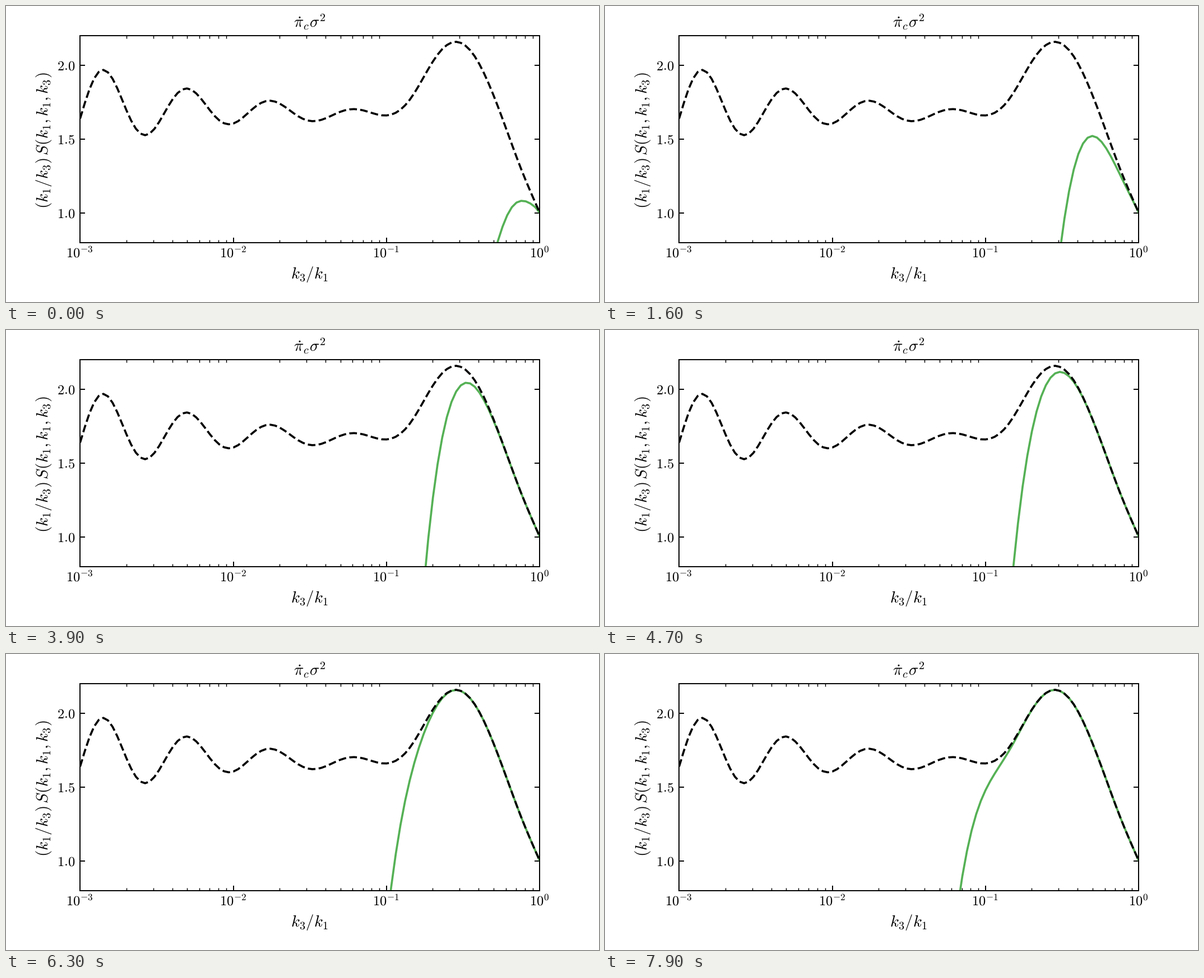
Animation of 1058x529 px, one loop 8 s. Source, as a matplotlib script:

```python
import numpy as np
import matplotlib.pyplot as plt
from matplotlib.animation import FuncAnimation
from matplotlib.ticker import FixedLocator, NullFormatter

W, H, DPI = 1058, 529, 128
PT = W / 6 / DPI          # layout points: 6 inches across the stage
FRAMES, STEP = 80, 100
LEFT, RIGHT, BOTTOM, TOP = 0.125 * W, 0.9 * W, 0.8 * H, 0.1 * H
LOW, HIGH = 0.8, 2.2

plt.rcParams.update({
    "mathtext.fontset": "cm",
    "font.family": "DejaVu Serif",
    "text.hinting": "none",
})


def spline(points):
    """Natural cubic spline through a few (x, y) points."""
    xk, yk = np.array(points, float).T
    n, h = len(xk), np.diff(xk)
    a, r = np.eye(n), np.zeros(n)
    for i in range(1, n - 1):
        a[i, i - 1:i + 2] = h[i - 1], 2 * (h[i - 1] + h[i]), h[i]
        r[i] = 6 * ((yk[i + 1] - yk[i]) / h[i] - (yk[i] - yk[i - 1]) / h[i - 1])
    m = np.linalg.solve(a, r)

    def f(x):
        i = np.clip(np.searchsorted(xk, x) - 1, 0, n - 2)
        d, p, q = h[i], xk[i + 1] - x, x - xk[i]
        return ((m[i] * p**3 + m[i + 1] * q**3) / (6 * d)
                + (yk[i] / d - m[i] * d / 6) * p
                + (yk[i + 1] / d - m[i + 1] * d / 6) * q)
    return f


# smooth plateau, then the bump and the fall to 1 (pixels)
background = spline([(132, 181), (390, 185), (560, 192.5), (640, 194.4),
                     (685, 188), (725, 158.3), (770, 92.4), (802, 65.5),
                     (836, 85.8), (870, 158), (919, 294), (952.2, 370)])


def final(x):
    """Background plus an oscillation damped as the square root of k."""
    amp = 67.5 * 10 ** ((173 - x) / 546.7)
    return background(x) - amp * np.cos(2 * np.pi * (x - 175.6) / 149.2)


def cross(t):
    """Pixel x where the growing curve enters the plot."""
    s = t - 44
    return 736 - 2.48 * s - 0.00037 * s**3


def rate(t):
    return 0.028 - 0.0056 * np.cos(2 * np.pi * (t - 12) / 90)


def bend(t):
    return 1e-4 * (0.8 + 1.5 * np.exp(-t / 8) + 1.4 * np.exp(-((t - 67) / 15) ** 2))


def to_value(y):
    return LOW + (HIGH - LOW) * (BOTTOM - y) / (BOTTOM - TOP)


def to_pixel(v):
    return BOTTOM - (v - LOW) / (HIGH - LOW) * (BOTTOM - TOP)


X = np.linspace(LEFT, RIGHT, 100)
K = np.logspace(-3, 0, 100)
BASE = final(X)


def growing(t):
    """The final curve minus a gap that closes to the right of the crossing."""
    c = cross(t)
    u = X - c
    gap = (BOTTOM - final(c)) * np.exp(-rate(t) * u - bend(t) * u * np.abs(u))
    gap *= np.tanh((RIGHT - X) / 14.6)
    return to_value(np.minimum(BASE + gap, 3000))


fig = plt.figure(figsize=(W / DPI, H / DPI), dpi=DPI, facecolor="white")
ax = fig.add_axes([0.125, 0.2, 0.775, 0.7])
ax.set_xscale("log")
ax.set_xlim(1e-3, 1)
ax.set_ylim(LOW, HIGH)
ax.xaxis.set_major_locator(FixedLocator([10.0**e for e in range(-3, 1)]))
ax.xaxis.set_minor_locator(
    FixedLocator([d * 10.0**e for e in range(-3, 0) for d in range(2, 10)]))
ax.yaxis.set_major_locator(FixedLocator([1, 1.5, 2]))
for axis in (ax.xaxis, ax.yaxis):
    axis.set_major_formatter(NullFormatter())
    axis.set_minor_formatter(NullFormatter())
ax.tick_params(which="major", direction="in", right=True,
               length=3.5 * PT, width=0.8 * PT)
ax.tick_params(which="minor", direction="in", top=True,
               length=2 * PT, width=0.6 * PT)
for s in ax.spines.values():
    s.set_linewidth(0.8 * PT)


def label(x, y, text, size, **kw):
    opts = dict(ha="center", va="baseline", fontsize=size * PT, color="black")
    opts.update(kw)
    fig.text(x / W, 1 - y / H, text, **opts)


for e in range(-3, 1):
    label(RIGHT + e * (RIGHT - LEFT) / 3 - 0.5, 449, f"$10^{{{e}}}$", 10)
for v in (1.0, 1.5, 2.0):
    label(123.5, to_pixel(v) + 8.5, f"${v:.1f}$", 10, ha="right")
MID = (LEFT + RIGHT) / 2
label(MID - 0.5, 38, r"$\dot{\pi}_c\sigma^2$", 11.7)
label(MID - 0.5, 487, r"$k_3/k_1$", 11.8)
label(76, 240, r"$(k_1/k_3)\,S(k_1,k_1,k_3)$", 11.9, rotation=90,
      rotation_mode="anchor")

green, = ax.plot(K, growing(0), color="#55b155", lw=1.5 * PT)
ax.plot(K, to_value(BASE), "--", color="black", lw=1.5 * PT)


def update(t):
    green.set_ydata(growing(t))
    return green,


anim = FuncAnimation(fig, update, frames=FRAMES, interval=STEP,
                     repeat=True, repeat_delay=0, blit=False)
plt.show()
```
